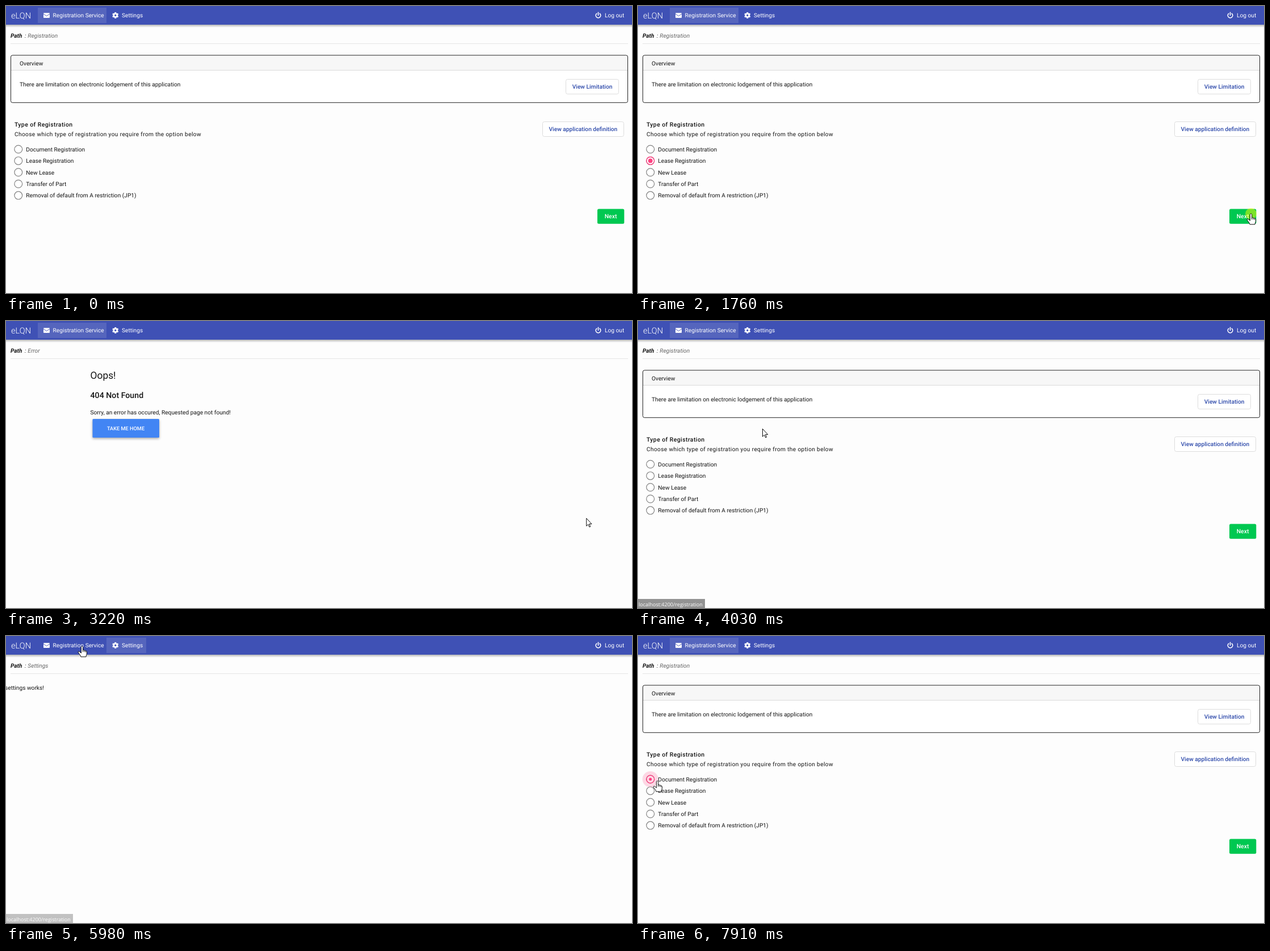
These frames come from a looping animation (1103x507 px, 7990 ms). An HTML page:

```html
<!DOCTYPE html>
<html lang="en">
<head>
<meta charset="utf-8">
<title>Registration service</title>
<style>
  html, body { margin: 0; width: 100%; height: 100%; overflow: hidden; background: #fdfdfd; }
  svg { display: block; }
  text { font: 10.2px Roboto, sans-serif; fill: #151515; text-rendering: geometricPrecision; white-space: pre; }
  .nav { fill: #fff; }
  .medium { font-weight: 500; }
  .link { font-weight: 500; fill: #2f4bab; }
  .spaced { letter-spacing: .34px; }
  .button { fill: #fff; stroke: #ddd; }
  .radio { fill: #fff; stroke: #828282; stroke-width: 1.2; }
  .cursor { fill: #fff; stroke: #000; stroke-width: .95; stroke-linejoin: round; }
</style>
</head>
<body>
<svg id="stage" width="1103" height="507" viewBox="0 0 1103 507"></svg>
<script>
const LOOP = 7990, PINK = '#ff4081';
const stage = document.getElementById('stage');

const text = (x, y, str, cls = '', style = '') =>
  `<text x="${x}" y="${y}" class="${cls}" style="${style}">${str}</text>`;
const rect = (x, y, w, h, attrs) =>
  `<rect x="${x}" y="${y}" width="${w}" height="${h}" ${attrs}/>`;

const options = ['Document Registration', 'Lease Registration', 'New Lease',
  'Transfer of Part', 'Removal of default from A restriction (JP1)'];
const optionY = i => 253 + i * 20.4;

const gearTeeth = Array.from({ length: 6 }, (_, i) =>
  rect(-1.5, -5.6, 3, 4, `rx=".6" transform="rotate(${i * 60})"`)).join('');

const navBar = `
  ${rect(0, 33, 1103, 5, 'fill="url(#shade)"')}
  ${rect(0, 0, 1103, 33, 'fill="#3f51b5"')}
  ${rect(56, 3, 121, 27, 'id="navRegistration" fill="#fff"')}
  ${rect(177, 3, 70, 27, 'id="navSettings" fill="#fff"')}
  <svg x="56" y="3" width="121" height="27"><circle id="rippleRegistration" cx="77" cy="15" fill="#fff"/></svg>
  <svg x="177" y="3" width="70" height="27"><circle id="rippleSettings" cx="45" cy="19" fill="#fff"/></svg>
  ${text(9, 22, 'eLQN', 'nav', 'font-size:14.6px;font-weight:300')}
  ${rect(66, 12.3, 11, 8.6, 'rx="1" fill="#fff"')}
  <path d="M66 14l5.5 3.7L77 14" fill="none" stroke="#5360bd"/>
  ${text(82.6, 20.2, 'Registration Service', 'nav')}
  <g transform="translate(192.8 16.5)" fill="#fff">${gearTeeth}<circle r="4.2"/><circle r="1.7" fill="#4a5ab9"/></g>
  ${text(204, 20.2, 'Settings', 'nav')}
  <path d="M1040.8 13.3a4.3 4.3 0 1 0 5.4 0M1043.5 11.2v5.2" fill="none" stroke="#fff" stroke-width="1.6" stroke-linecap="round"/>
  ${text(1055, 20.2, 'Log out', 'nav')}
  ${text(8, 56, 'Path', '', 'font-weight:700;font-style:italic')}
  ${text(33, 56, ':', '', 'font-style:italic')}
  <text id="crumb" x="38.3" y="56" style="font-style:italic;fill:#666"></text>
  ${rect(8, 66, 1088, 1, 'fill="#e5e5e5"')}`;

const registrationPage = `<g id="registration">
  ${rect(8.5, 87, 1087, 83.7, 'rx="3" fill="#fff"')}
  ${rect(9, 87.5, 1086, 26.5, 'rx="2" fill="#f7f7f7"')}
  ${rect(9, 113, 1086, 1, 'fill="#d9d9d9"')}
  ${rect(8.5, 87, 1087, 83.7, 'rx="3" fill="none" stroke="#222"')}
  ${text(24, 104.6, 'Overview')}
  ${text(24, 142, 'There are limitation on electronic lodgement of this application')}
  ${rect(986.5, 129.5, 93, 26, 'rx="3" class="button"')}
  ${text(997.7, 146, 'View Limitation', 'link')}
  ${text(15, 212.6, 'Type of Registration', 'medium', 'font-size:10.5px;letter-spacing:.4px')}
  ${text(15, 230.4, 'Choose which type of registration you require from the option below', 'spaced')}
  ${rect(945.5, 204.5, 143, 26, 'rx="3" class="button"')}
  ${text(956.5, 220.8, 'View application definition', 'link')}
  ${options.map((label, i) => `<circle class="radio" cx="21.8" cy="${optionY(i)}" r="6.9"/>
    ${text(35.3, optionY(i) + 3.7, label)}`).join('')}
  <g id="choice"><circle id="choiceRipple" fill="${PINK}"/>
    <circle r="6.9" fill="none" stroke="${PINK}" stroke-width="1.3"/>
    <circle id="choiceDot" fill="${PINK}"/></g>
  ${rect(1042, 358.4, 47.3, 26.3, 'rx="2.5" fill="#00c851"')}
  ${text(1054.7, 375, 'Next', 'nav medium', 'font-size:10.4px')}
</g>`;

const errorPage = `<g id="error">
  ${text(148.5, 101.5, 'Oops!', '', 'font-size:17.4px')}
  ${text(148.5, 135.5, '404 Not Found', 'medium', 'font-size:14.2px')}
  ${text(148.5, 164.7, 'Sorry, an error has occured, Requested page not found!')}
  ${rect(152.5, 173, 117.5, 33, 'rx="1.5" fill="#4285f4" style="filter:drop-shadow(0 2px 2px #0005)"')}
  ${text(178, 193, 'TAKE ME HOME', 'nav medium', 'font-size:9.2px')}
</g>`;

stage.innerHTML = `
  <linearGradient id="shade" x2="0" y2="1">
    <stop stop-color="#000" stop-opacity=".28"/><stop offset="1" stop-color="#000" stop-opacity="0"/>
  </linearGradient>
  ${navBar}${registrationPage}${errorPage}
  <g id="settings">${text(-2, 95, 'settings works!')}</g>
  <g id="status">${rect(0, 491, 118, 16, 'id="statusBox" fill="#3c3c3c"')}
    <text id="statusText" x="1" y="503.5" style="font:9.05px 'Open Sans',sans-serif;fill:#fff"></text></g>
  <g id="pointer"><circle id="press" r="10" fill="#ff0" opacity=".48"/>
    <path id="arrow" class="cursor" d="M.5.5V14.2L3.6 11.3 5.7 16 7.6 15.2 5.5 10.6H9.8Z"/>
    <path id="hand" class="cursor" d="M-1.6 1.6C-1.6-.5 1.6-.5 1.6 1.6V7C2.8 6.2 4 6.7 4.2 7.8 5.2 7.2 6.3 7.6 6.5 8.6
      7.6 8.2 8.4 8.8 8.4 10V13C8.4 15 7 16 7 18.8H-2C-2 16.5-6.3 12.5-6.8 10.6-7 9.2-5.3 8.8-4.2 9.8L-1.6 12.2ZM1.6 7V10M4.2 8V10.3M6.5 9V10.6"/>
  </g>`;

const el = Object.fromEntries([...stage.querySelectorAll('[id]')].map(e => [e.id, e]));
const set = (e, attrs) => { for (const k in attrs) e.setAttribute(k, attrs[k]); };
const show = (e, on) => set(e, { display: on ? 'inline' : 'none' });
const ramp = (t, start, length) => Math.max(0, Math.min(1, (t - start) / length));
const ease = f => f * f * (3 - 2 * f);

// A page opens shortly after its click; links with a hover time show their address
const PAGE_DELAY = 80;
const visits = [
  { click: 1750, page: 'error' },
  { click: 3940, page: 'registration', hover: 3700 },
  { click: 4710, page: 'settings', hover: 4500 },
  { click: 6300, page: 'registration', hover: 5935 },
];
const choices = [{ click: 800, option: 1 }, { click: 7760, option: 0 }];
const clicks = [...visits, ...choices].map(c => c.click);

// Pointer moves along bent paths, resting in between
const entry = [903, 427];
const moves = [
  { from: 70, until: 800, to: [36, 271], bend: [160, 70] },
  { from: 890, until: 1450, to: [1080, 367], bend: [1200, 380] },
  { from: 3140, until: 3850, to: [219, 190], bend: [265, 97] },
  { from: 4030, until: 4600, to: [222, 22], bend: [222, 100] },
  { from: 5630, until: 5980, to: [134, 18], bend: [178, 0] },
  { from: 6420, until: 7060, to: [19, 252], bend: [140, 130] },
  { from: 7220, until: 7370, to: [26, 267], bend: [22, 260] },
  { from: 7540, until: 7755, to: [34, 256], bend: [30, 262] },
];

function pointerAt(t) {
  let spot = entry;
  for (const { from, until, to, bend } of moves) {
    const f = ease(ramp(t, from, until - from)), g = 1 - f;
    spot = spot.map((v, i) => g * g * v + 2 * f * g * bend[i] + f * f * to[i]);
  }
  return spot;
}

function isOverLink(x, y, page) {
  const inside = (left, top, right, bottom) => x > left && x < right && y > top && y < bottom;
  return inside(56, 3, 247, 30)
    || page === 'registration' && (inside(14, 245, 230, 342) || inside(1042, 358, 1089, 385))
    || page === 'error' && inside(152, 173, 270, 206);
}

function navRipple(circle, age) {
  set(circle, { r: Math.max(0, Math.min(90, age * .37)), opacity: .1 * (1 - ramp(age, 0, 450)) });
}

function drawStatus(t) {
  const link = visits.findLast(v => t >= v.hover);
  const opacity = link ? ramp(t, link.hover, 150) * (1 - ramp(t, link.click, 200)) : 0;
  set(el.status, { opacity });
  if (!link) return;
  set(el.statusBox, { width: link.page === 'settings' ? 103 : 118 });
  el.statusText.textContent = 'localhost:4200/' + link.page;
}

function drawChoice(t, pageOpened) {
  const choice = choices.findLast(c => t >= c.click + 70 && c.click > pageOpened);
  show(el.choice, choice);
  if (!choice) return;
  const age = t - choice.click - 70;
  set(el.choice, { transform: `translate(21.8 ${optionY(choice.option)})` });
  set(el.choiceRipple, { r: 14 * ramp(age, 0, 78), opacity: .2 * (1 - ramp(age, 260, 300)) });
  set(el.choiceDot, { r: 3.9 * ramp(age, 0, 125) });
}

function draw(t) {
  const visit = visits.findLast(v => t >= v.click + PAGE_DELAY);
  const page = visit ? visit.page : 'registration';
  for (const name of ['registration', 'error', 'settings']) show(el[name], name === page);
  el.crumb.textContent = page[0].toUpperCase() + page.slice(1);

  const [, , toSettings, back] = visits;
  const settingsActive = ramp(t, toSettings.click, 200) - ramp(t, back.click, 200);
  set(el.navSettings, { opacity: .115 * settingsActive });
  set(el.navRegistration, { opacity: .115 * (1 - settingsActive) });
  navRipple(el.rippleSettings, t - toSettings.click - PAGE_DELAY);
  navRipple(el.rippleRegistration, t - back.click);

  drawChoice(t, visit ? visit.click : 0);
  drawStatus(t);

  const [x, y] = pointerAt(t), onLink = isOverLink(x, y, page);
  show(el.pointer, t >= moves[0].from);
  set(el.pointer, { transform: `translate(${x} ${y})` });
  show(el.hand, onLink);
  show(el.arrow, !onLink);
  show(el.press, clicks.some(c => t >= c && t < c + 75));
}

function tick() {
  draw(performance.now() % LOOP);
  requestAnimationFrame(tick);
}
tick();
</script>
</body>
</html>
```
